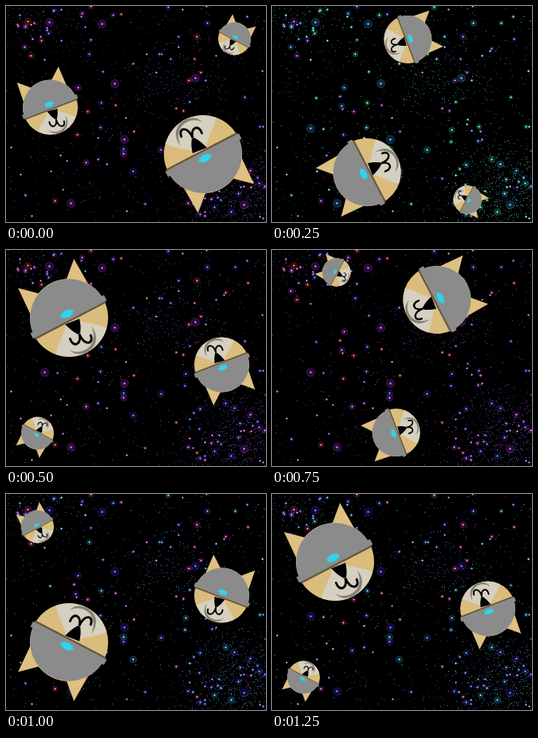
Recreate the animation shown at these times as an HTML page with a canvas. Size 326 px wide and 271 px high, loop 1.5 s.

```html
<!DOCTYPE html>
<html lang="en">
<head>
<meta charset="utf-8">
<title>Tumbling space dogs</title>
<style>
html, body { margin: 0; width: 100%; height: 100%; overflow: hidden; background: #000; }
canvas { display: block; }
</style>
</head>
<body>
<canvas id="stage" width="326" height="271"></canvas>
<script>
const W = 326, H = 271, STEP = 250, TAU = Math.PI * 2;
const ctx = document.getElementById('stage').getContext('2d');

// One arrangement of heads, placed from the stage centre and tumbled as a whole
const heads = [
  { x: -84, y: -50.5, r: 49, angle: -27.5, mirror: 1 },
  { x: 107.5, y: 8.5, r: 34.5, angle: 159, mirror: 1 },
  { x: -123.5, y: 94.5, r: 20.5, angle: -152, mirror: -1 }
];
const steps = [
  { turn: 180, shift: 0 },
  { turn: -90, shift: -75 },
  { turn: 0, shift: 0 },
  { turn: 90, shift: 0 },
  { turn: 0, shift: -35, flip: true },
  { turn: 0, shift: -35 }
];

let seed = 41;
const rnd = () => (seed = seed * 16807 % 2147483647) / 2147483647;
const bell = () => (rnd() + rnd() + rnd()) / 1.5 - 1;
const cloud = (x, y, w, h) => () => [x + bell() * w, y + bell() * h];
const anywhere = () => [rnd() * W, rnd() * H];
const corner = cloud(295, 230, 110, 80);
const topLeft = cloud(40, 20, 85, 45);

const dust = [], stars = [];
function addDust(count, place) {
  while (count--) {
    const [x, y] = place().map(Math.floor);
    const hue = rnd() < .8 ? 220 + rnd() * 45 : 275 + rnd() * 85;
    dust.push({ x, y, hue, light: 30 + rnd() * 40, alpha: .25 + rnd() * .6 });
  }
}
function addStars(count, place) {
  while (count--) {
    const [x, y] = place().map(Math.floor);
    const hue = [235, 260, 285, 350][Math.floor(rnd() * 4)];
    stars.push({ x, y, hue, r: 2 + 3 * rnd() ** 2 });
  }
}
addDust(800, anywhere);
addDust(800, corner);
addDust(110, topLeft);
addDust(200, cloud(205, 95, 100, 50));
addStars(95, anywhere);
addStars(30, corner);
addStars(20, topLeft);
// The most prominent stars
for (const [x, y] of [[54,20], [120,22], [136,97], [237,90], [48,153], [148,167], [81,247], [298,249]])
  stars.push({ x, y, hue: 280, r: 6 });

function drawStar({ x, y, r, hue }, shift) {
  const tint = (light, a) => `hsla(${hue + shift},65%,${light}%,${a})`;
  const cx = x + .5, cy = y + .5;
  const g = ctx.createRadialGradient(cx, cy, 0, cx, cy, r);
  g.addColorStop(0, tint(60, .7));
  g.addColorStop(.45, tint(45, .25));
  g.addColorStop(.85, tint(45, .35));
  g.addColorStop(1, tint(40, 0));
  ctx.fillStyle = g;
  ctx.fillRect(cx - r, cy - r, r * 2, r * 2);
  ctx.fillStyle = tint(62, .75);
  ctx.fillRect(x - 1, y, 3, 1);
  ctx.fillRect(x, y - 1, 1, 3);
  ctx.fillStyle = tint(88, 1);
  ctx.fillRect(x, y, 1, 1);
}

function drawSky(shift) {
  ctx.fillStyle = '#000';
  ctx.fillRect(0, 0, W, H);
  for (const d of dust) {
    ctx.fillStyle = `hsla(${d.hue + shift},55%,${d.light}%,${d.alpha})`;
    ctx.fillRect(d.x, d.y, 1, 1);
  }
  for (const star of stars) drawStar(star, shift);
}

// Head parts, drawn for a radius of 49
const ears = new Path2D('M19-44L39.5-62.5L41-25ZM-19-44L-39.5-62.5L-41-25Z');
const face = new Path2D('M-49 0A49 49 0 0 0 49 0A49 49 0 0 0-49 0Z');
const muzzle = new Path2D('M-6 3C-10 14-26 20-36 33A49 49 0 0 0 36 33C26 20 10 14 6 3Z');
const chin = new Path2D('M20 22C26 54-14 55-18 36C-9 50 18 50 20 22Z');
const nose = new Path2D('M-8 5L11 7Q9 16 4 23Q2 25 0 23Q-5 16-8 5Z');
const mouth = new Path2D('M-11 24C-13 36-1 38 2 24C0 41 13 44 14 32');
const brimShade = new Path2D('M-50 2H50V5H-50Z');
const helmet = new Path2D('M-48.7-5A49 49 0 0 1 48.7-5H52V2.5H-52V-5Z');
const badge = new Path2D();
badge.ellipse(0, -5.5, 8.5, 4.5, 0, 0, TAU);

function fill(path, color) {
  ctx.fillStyle = color;
  ctx.fill(path);
}

function turnBy(degrees) {
  ctx.rotate(degrees * TAU / 360);
}

function drawHead({ x, y, r, angle, mirror }) {
  ctx.save();
  ctx.translate(x, y);
  turnBy(angle);
  ctx.scale(mirror * r / 49, r / 49);
  fill(ears, '#dec081');
  fill(face, '#dabd7c');
  fill(muzzle, '#d5d0bf');
  fill(chin, '#858176');
  fill(nose, '#000');
  ctx.lineWidth = 2.8;
  ctx.lineCap = 'round';
  ctx.stroke(mouth);
  fill(brimShade, '#66583c');
  fill(helmet, '#8b8b8b');
  fill(badge, '#2fd3ee');
  ctx.restore();
}

function drawScene({ turn, shift, flip }) {
  drawSky(shift);
  // Sideways, the arrangement shrinks to fit the stage height
  const size = turn % 180 ? .87 : 1;
  ctx.save();
  ctx.translate(W / 2, H / 2);
  turnBy(turn);
  ctx.scale(size, flip ? -size : size);
  heads.forEach(drawHead);
  ctx.restore();
}

let shown = -1;
function play() {
  const step = Math.floor(performance.now() / STEP) % steps.length;
  if (step !== shown) drawScene(steps[shown = step]);
  requestAnimationFrame(play);
}
play();
</script>
</body>
</html>
```
